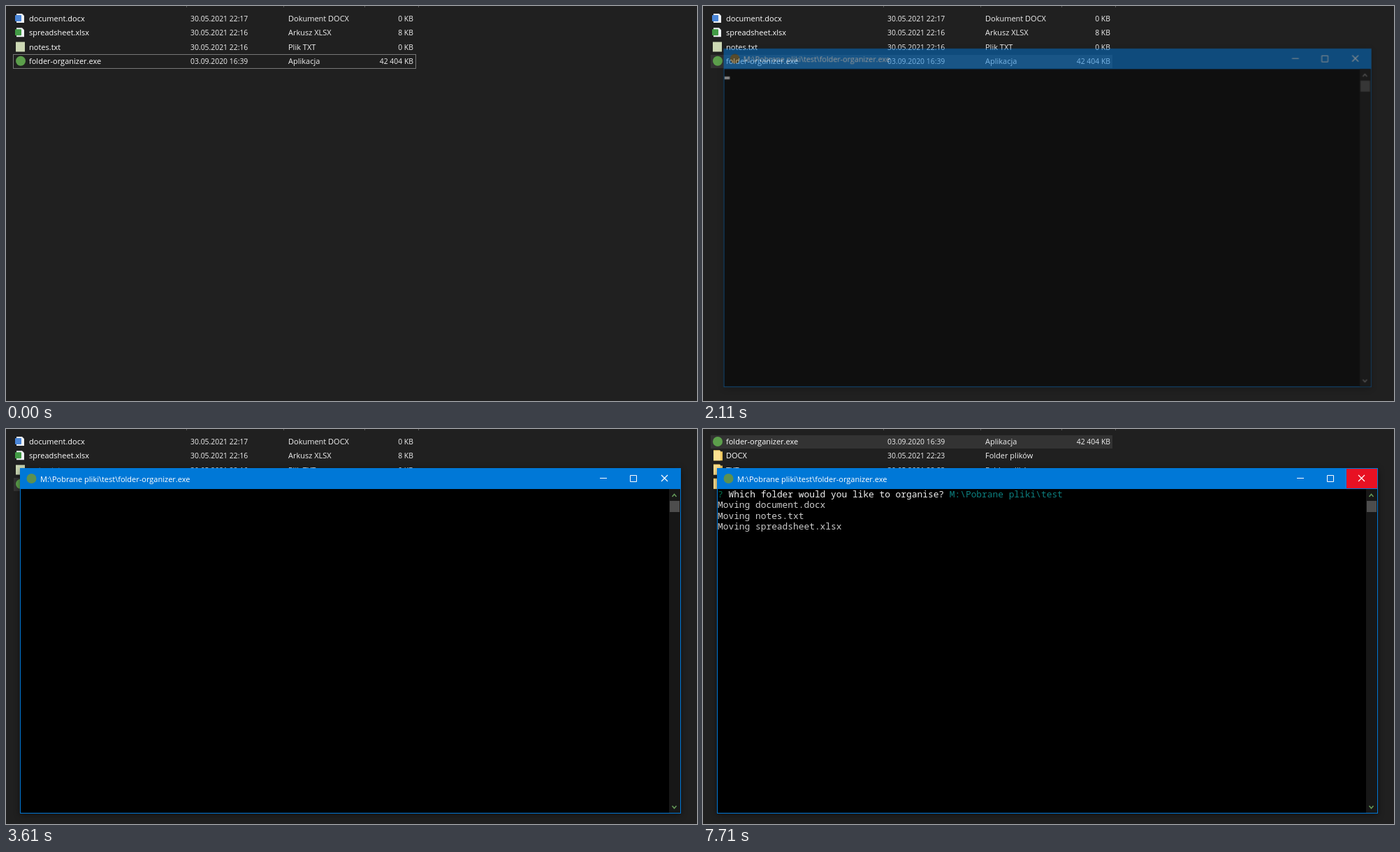
Animation, 989 px wide and 566 px high, one loop 8 s. Source, as an HTML page:

```html
<!DOCTYPE html>
<html lang="pl">
<head>
<meta charset="utf-8">
<title>Folder organizer</title>
<style>
html, body { margin: 0; width: 100%; height: 100%; overflow: hidden; background: #202020; }
svg { display: block; width: 989px; height: 566px; }
text { white-space: pre; }
.ui { font: 11px "Open Sans", "Noto Sans", sans-serif; fill: #fff; }
.soft { fill: #f0f0f0; }
.num { font-size: 10.4px; }
.end { text-anchor: end; }
.mono { font: 12.87px "Noto Sans Mono", "DejaVu Sans Mono", monospace; fill: #ccc; }
.mono .ask { fill: #f2f2f2; }
.mono .mark { fill: #00704a; }
.mono .teal { fill: #0c8080; }
.line { fill: none; stroke: #fff; }

#picked { animation: pick 8s step-end infinite; }
@keyframes pick {
  0% { fill: transparent; }
  10.375% { fill: #4d4d4d; }
  21.75% { fill: #777; }
  25.125% { fill: #333; }
}
#window {
  transform-origin: 493px 303px;
  animation: fade 8s linear infinite, grow 8s linear infinite;
}
@keyframes fade {
  0%, 25.124% { opacity: 0; }
  25.125% { opacity: .13; }
  28.025%, 100% { opacity: 1; }
}
@keyframes grow {
  0%, 25.125% { transform: scale(.95); }
  25.625% { transform: scale(.9655); }
  26.375% { transform: scale(.98); }
  27.625% { transform: scale(.9915); }
  28.875% { transform: scale(.997); }
  30.625%, 100% { transform: scale(1); }
}
#appIcon { animation: tint 8s step-end infinite; }
@keyframes tint { 0% { fill: #7d6426; } 30.5% { fill: #5c9150; } }
#arrows { animation: arrow 8s step-end infinite; }
@keyframes arrow { 0% { stroke: #858585; } 30.5% { stroke: #659a58; } }
#closeHot { animation: hot 8s linear infinite; }
@keyframes hot {
  0%, 93.3% { opacity: 0; }
  94.375%, 100% { opacity: 1; }
}
#shade { filter: drop-shadow(0 2px 5px rgba(0, 0, 0, .45)); }
</style>
</head>
<body>
<svg viewBox="0 0 989 566">
  <rect width="989" height="566" fill="#202020"/>
  <path d="M258.5 0v2M397.5 0v2M513.5 0v2M590.5 0v2" stroke="#555"/>

  <g id="before">
    <rect id="picked" x="11" y="70" width="575" height="19"/>
    <rect id="focus" x="10.5" y="69.5" width="576" height="20" fill="none" stroke="#777"/>
  </g>
  <g id="after"><rect x="11" y="9" width="575" height="19" fill="#333"/></g>

  <g id="window">
    <rect id="shade" x="20" y="56" width="946" height="495" fill="#0078d7"/>
    <rect x="21" y="86" width="944" height="464"/>
    <circle id="appIcon" cx="36.5" cy="71" r="7"/>
    <text class="ui" x="49" y="75.5">M:\Pobrane pliki\test\folder-organizer.exe</text>
    <rect id="closeHot" x="921" y="57" width="44" height="28" fill="#e81123"/>
    <path class="line" d="M850 70.5h10M893.5 66.5h9v9h-9z"/>
    <path class="line" d="M938 66l9 9M947 66l-9 9" stroke-width="1.2"/>
    <rect x="949" y="86" width="16" height="464" fill="#171717"/>
    <rect x="950" y="103" width="14" height="16" fill="#4d4d4d"/>
    <path id="arrows" d="M953.5 97l3-3.5 3 3.5M953.5 540l3 3.5 3-3.5" fill="none" stroke-width="1.5"/>
    <g id="console" class="mono">
      <rect id="startCursor" x="21" y="97" width="8" height="4" fill="#f2f2f2"/>
      <g id="prompt"></g>
      <g id="first"></g>
      <g id="second"></g>
      <g id="result"></g>
      <rect id="endCursor" x="21" y="159" width="8" height="4"/>
    </g>
  </g>
</svg>
<script>
const LOOP = 8000;
const byId = id => document.getElementById(id);
const add = (id, markup) => byId(id).insertAdjacentHTML('beforeend', markup);

const icons = {
  page: color => `<path d="M15 11h8l3 3v10h-11z" fill="#eef1f4"/>
    <rect x="13" y="13" width="9" height="9" rx="1" fill="${color}"/>`,
  note: () => '<rect x="14" y="11" width="13" height="14" fill="#ccd8b4"/>',
  app: () => '<circle cx="21" cy="18" r="7" fill="#5c9f4b"/>',
  folder: () => `<path d="M15 10h9l1 2h3v13h-13z" fill="#eec65e"/>
    <rect x="15" y="11" width="10" height="14" fill="#ffe290"/>`
};

function listFiles(id, files) {
  files.forEach(([icon, color, name, date, kind, size], row) => add(id,
    `<g class="ui" transform="translate(0 ${(row * 20.25).toFixed(2)})">${icons[icon](color)}
      <text x="33" y="22">${name}</text>
      <text class="soft num" x="264" y="22">${date}</text>
      <text class="soft" x="404" y="22">${kind}</text>
      <text class="soft num end" x="583" y="22">${size}</text></g>`));
}

const app = ['app', '', 'folder-organizer.exe', '03.09.2020 16:39', 'Aplikacja', '42 404 KB'];
listFiles('before', [
  ['page', '#4a86d8', 'document.docx', '30.05.2021 22:17', 'Dokument DOCX', '0 KB'],
  ['page', '#429b45', 'spreadsheet.xlsx', '30.05.2021 22:16', 'Arkusz XLSX', '8 KB'],
  ['note', '', 'notes.txt', '30.05.2021 22:16', 'Plik TXT', '0 KB'],
  app
]);
listFiles('after', [app, ...['DOCX', 'TXT', 'XLSX'].map(name =>
  ['folder', '', name, '30.05.2021 22:23', 'Folder plików', ''])]);

const print = (id, row, markup, style = '') =>
  add(id, `<text class="${style}" x="21" y="${98 + row * 15.45}">${markup}</text>`);

const question = '<tspan class="mark">?</tspan> <tspan class="ask">Which folder would you like to organise?</tspan> ';
const folder = 'M:\\Pobrane pliki\\test';
print('prompt', 0, question);
print('prompt', 1, `<tspan class="ask"> Current directory:</tspan> ${folder}`);
print('prompt', 5, '  ──────────────');
print('prompt', 7, '  ──────────────');
print('prompt', 9, ' Use arrow keys or / to search this directory');

const choices = ['choose this directory', 'go back a directory'];
['first', 'second'].forEach((id, active) => choices.forEach((choice, i) =>
  print(id, 3 + i, (i === active ? '&gt; ' : '  ') + choice, i === active ? 'teal' : '')));

print('result', 0, `${question}<tspan class="teal">${folder}</tspan>`);
['document.docx', 'notes.txt', 'spreadsheet.xlsx'].forEach((file, i) =>
  print('result', i + 1, `Moving ${file}`));

// Makes an element visible only during the given [from, to] spans in ms.
function show(id, ...spans) {
  const steps = spans.map(([from, to]) =>
    `${from / LOOP * 100}% { visibility: visible } ${to / LOOP * 100}% { visibility: hidden }`);
  const start = spans[0][0] ? '0% { visibility: hidden }' : '';
  return `@keyframes show-${id} { ${start} ${steps.join(' ')} }
    #${id} { animation: show-${id} ${LOOP}ms step-end infinite }`;
}

const sheet = document.createElement('style');
sheet.textContent = [
  show('focus', [0, 830]),
  show('before', [0, 6620]),
  show('after', [6620, LOOP]),
  show('startCursor', [2010, 2430]),
  show('prompt', [2430, 3610], [3640, 4220], [4240, 5090]),
  show('first', [2430, 3610], [4240, 5090]),
  show('second', [3640, 4220]),
  show('result', [5110, LOOP]),
  show('endCursor', [5110, 5630], [6150, 6670], [7170, 7710])
].join('\n');
document.head.append(sheet);
</script>
</body>
</html>
```
